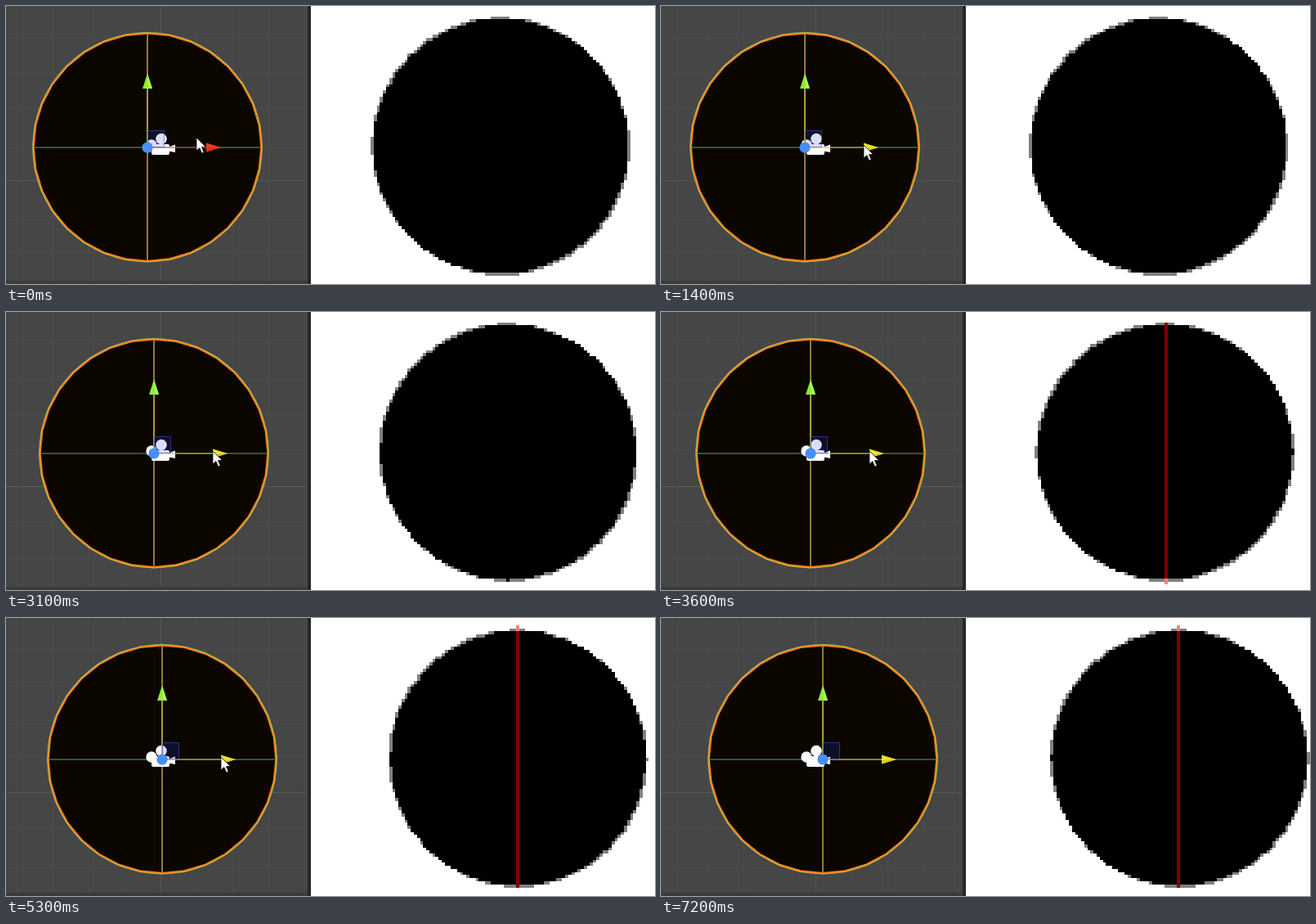
Write an HTML page with a canvas that moves like this. It is 794x340 px and loops after 7300 ms.

```html
<!DOCTYPE html>
<html lang="en">
<head>
<meta charset="utf-8">
<title>Pixel coverage</title>
<style>
html, body { margin: 0; width: 100%; height: 100%; overflow: hidden; background: #fff; }
canvas { display: block; }
</style>
</head>
<body>
<canvas id="stage" width="794" height="340"></canvas>
<script>
const ctx = document.getElementById('stage').getContext('2d');
const LOOP = 7300, TICK = 100, TAU = Math.PI * 2;
const HOVER_AT = 300, GRAB_AT = 600, HIDE_AT = 6700;
const START_X = 173, END_X = 198, MID_Y = 172.7;

// Low resolution view, measured in cells
const CELL_W = 3.7805, CELL_H = 3.772, GRID_X = 446.05, GRID_Y = 12.72;
const DISC_Y = 42.12, DISC_R = 41.65, SIDES = 32;
const LINE_HALF = 0.13;

// Pace of the drag: [time, x]
const PACE = [[1000, 172], [1400, 176], [2500, 178], [3200, 182],
  [4500, 188], [5400, 192], [6200, 196], [6900, END_X]];

function pace(t) {
  const i = PACE.findIndex(([time]) => time > t);
  if (i === 0) return PACE[0][1];
  if (i < 0) return END_X;
  const [t0, x0] = PACE[i - 1], [t1, x1] = PACE[i];
  return x0 + (x1 - x0) * (t - t0) / (t1 - t0);
}

// The disc is nudged by two pixels, passing the midpoint for one tick
function discX(t) {
  const nudge = time => 2 * Math.floor(pace(time) / 2);
  return Math.max(START_X, (nudge(t) + nudge(t + TICK)) / 2);
}

const discCell = x => 49.8 - 0.308 * (END_X - x);

function rect(x, y, w, h, color) {
  ctx.fillStyle = color;
  ctx.fillRect(x, y, w, h);
}

function path(points) {
  ctx.beginPath();
  points.forEach(([x, y]) => ctx.lineTo(x, y));
  ctx.closePath();
}

function shape(points, color) {
  path(points);
  ctx.fillStyle = color;
  ctx.fill();
}

function ball(x, y, r, color) {
  ctx.beginPath();
  ctx.arc(x, y, r, 0, TAU);
  ctx.fillStyle = color;
  ctx.fill();
}

function stroke(width, color) {
  ctx.lineWidth = width;
  ctx.strokeStyle = color;
  ctx.stroke();
}

function polygon(x, y, r) {
  return Array.from({ length: SIDES }, (_, i) => {
    const a = i * TAU / SIDES;
    return [x + r * Math.cos(a), y + r * Math.sin(a)];
  });
}

function drawGrid() {
  rect(0, 0, 369, 340, '#464646');
  for (let k = -4; k <= 4; k++) {
    const color = k ? '#4b4b4b' : '#575757';
    rect(189 + k * 44, 0, 1, 336, color);
    rect(0, Math.round(213 + k * 43.8), 369, 1, color);
  }
  rect(0, 336, 369, 4, '#3b3b3b');
  rect(369, 0, 4, 340, '#282828');
}

function drawCamera() {
  const white = '#fbfbfb';
  ball(178, 170, 6.7, white);
  ball(190, 162.5, 6.8, white);
  ctx.beginPath();
  ctx.roundRect(178, 169, 22, 13, 2);
  ctx.fill();
  shape([[199, 172.5], [207, 169.5], [207, 179], [199, 177.5]], white);
}

function drawDisc(x) {
  const rim = polygon(x, MID_Y, 139.6);
  shape(rim, '#0b0600');
  stroke(2.6, '#ff7d14');
  ctx.beginPath();
  ctx.arc(x, MID_Y, 140.2, 0, TAU);
  stroke(1.2, 'rgba(145,220,110,0.65)');

  rect(x - 140, 172.5, 280, 1, '#64a06c');
  rect(x - 0.8, 33, 1.6, 280, '#b6963f');
}

function drawHandles(x, hover) {
  rect(x, 172.5, 73, 1, hover ? '#c9b737' : '#8b4733');
  rect(x - 0.8, 101, 1.6, 72, '#b5a244');
  ctx.beginPath();
  ctx.rect(x + 0.5, 152.5, 20, 20);
  ctx.fillStyle = 'rgba(45,65,255,0.16)';
  ctx.fill();
  stroke(1, 'rgba(55,80,200,0.6)');

  shape([[x, 82.5], [x + 6, 101], [x - 6, 101]], '#91e936');
  shape([[x, 82.5], [x + 6, 101], [x + 1, 101]], '#a8fa57');
  shape([[x + 90, 173], [x + 72, 167.5], [x + 72, 178.5]], hover ? '#ece12e' : '#ea3f20');
  shape([[x + 90, 173], [x + 72, 174], [x + 72, 178.5]], hover ? '#d6c920' : '#cf3518');
  ball(x, 173, 6.6, '#478ff5');
}

function drawPointer(x, y) {
  path([[0, 0], [0, 16], [3.8, 12.6], [6.6, 19], [9.2, 17.9], [6.5, 11.6], [11.5, 11.4]]
    .map(([dx, dy]) => [x + dx, y + dy]));
  ctx.fillStyle = '#fff';
  ctx.fill();
  stroke(0.8, '#111');
}

// Half width of the disc polygon at a height dy from its middle
function halfWidth(dy) {
  const d = Math.abs(dy), step = TAU / SIDES;
  if (d > DISC_R) return -1;
  const a = Math.floor(Math.asin(d / DISC_R) / step) * step;
  const y0 = DISC_R * Math.sin(a), y1 = DISC_R * Math.sin(a + step);
  const f = (d - y0) / (y1 - y0);
  return DISC_R * (Math.cos(a) * (1 - f) + Math.cos(a + step) * f);
}

// Each cell averages two samples on its diagonal
function drawCells(center) {
  rect(373, 0, 421, 340, '#fff');
  const edgeX = i => Math.round(GRID_X + i * CELL_W);
  const edgeY = j => Math.round(GRID_Y + j * CELL_H);
  const first = Math.floor(center - DISC_R) - 1, last = first + 88;

  for (let j = -1; j <= 84; j++) {
    const samples = [0.25, 0.75].map(o => ({
      o, half: halfWidth(j + o - DISC_Y), lined: j + o > -0.5 && j + o < 84.5
    }));
    const colorAt = i => {
      let red = 0, rest = 0;
      for (const { o, half, lined } of samples) {
        const d = Math.abs(i + o - center);
        const onLine = lined && d < LINE_HALF, outside = d > half;
        if (onLine || outside) red += 127.5;
        if (outside && !onLine) rest += 127.5;
      }
      return `rgb(${Math.round(red)},${Math.round(rest)},${Math.round(rest)})`;
    };
    let start = first, color = colorAt(first);
    for (let i = first + 1; i <= last; i++) {
      const next = colorAt(i);
      if (next === color && i < last) continue;
      rect(edgeX(start), edgeY(j), edgeX(i) - edgeX(start), edgeY(j + 1) - edgeY(j), color);
      start = i;
      color = next;
    }
  }
}

function draw(t) {
  const x = discX(t);
  drawCells(discCell(x));
  drawGrid();
  drawDisc(x);
  drawCamera();
  drawHandles(x, t >= HOVER_AT);
  if (t < GRAB_AT) {
    const u = t / GRAB_AT;
    drawPointer(233 + 12 * u, 161 + 9 * u + 5 * Math.sin(Math.PI * u));
  } else if (t < HIDE_AT) {
    drawPointer(x + 72, 170);
  }
}

const begin = performance.now();
function tick() {
  const t = (performance.now() - begin) % LOOP;
  draw(Math.floor(t / TICK) * TICK);
  requestAnimationFrame(tick);
}
tick();
</script>
</body>
</html>
```
